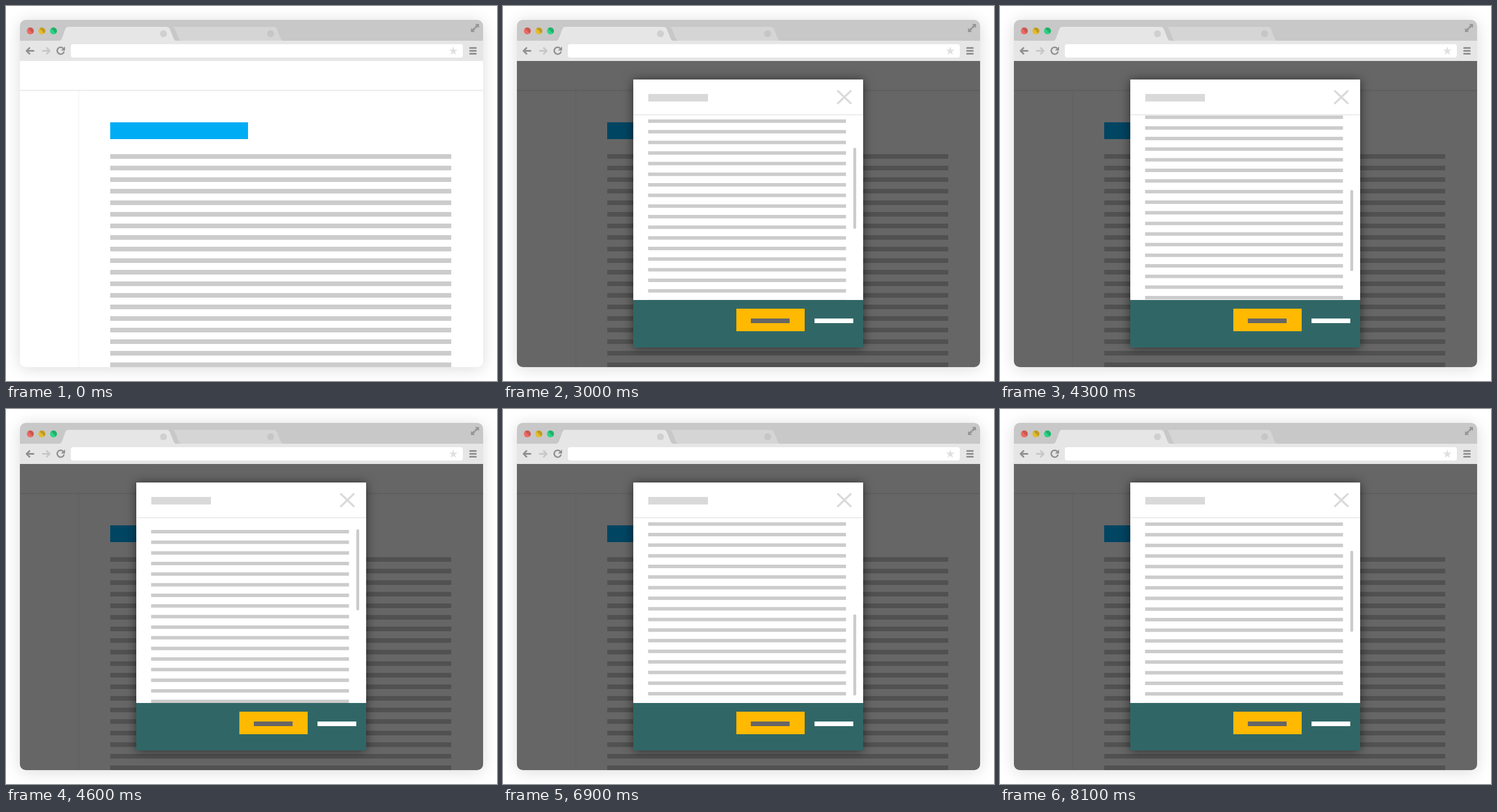
An HTML page for the animation above (8200 ms loop, 848 px wide and 648 px high).

```html
<!DOCTYPE html>
<html lang="en">
<head>
<meta charset="utf-8">
<title>Scrolling dialog</title>
<style>
  html, body { margin: 0; width: 100%; height: 100%; overflow: hidden; background: #fff; }
  #win { position: absolute; left: 24px; top: 24px; width: 800px; height: 600px; border-radius: 10px;
         overflow: hidden; background: #fff; box-shadow: 0 3px 28px rgba(0,0,0,.14); }
  svg { display: block; }
  .edge { fill: #fff; filter: drop-shadow(0 1px 1.2px rgba(0,0,0,.14)); }
  .icon { fill: none; stroke: #919191; stroke-width: 3; stroke-linecap: round; stroke-linejoin: round; }
</style>
</head>
<body>
<div id="win">
<svg width="800" height="600" viewBox="24 24 800 600">
  <!-- page -->
  <rect class="edge" x="10" y="130" width="115" height="520"/>
  <rect class="edge" x="10" y="90" width="830" height="55"/>
  <path fill="#00adf5" d="M180 201h238v29h-238z"/>
  <path stroke="#ccc" stroke-width="589" stroke-dasharray="8 12" d="M474.5 256V624"/>

  <!-- dialog -->
  <g id="dialog">
    <path fill="#000" fill-opacity=".6" d="M24 95h800v529h-800z"/>
    <path fill="#fff" style="filter:drop-shadow(0 1px 9px rgba(0,0,0,.55))" d="M225 127h397v463h-397z"/>
    <path id="lines" stroke="#ccc" stroke-width="341.8" stroke-dasharray="6 12.3333" d="M421.5 209v336"/>
    <rect id="thumb" x="605" y="208" width="5" height="140" rx="2" fill="#ccc"/>
    <rect class="edge" x="225" y="127" width="397" height="60"/>
    <path fill="#d9d9d9" d="M251 152h103v13h-103z"/>
    <path stroke="#dadada" stroke-width="3.5" d="M577.5 146l24 23m0-23l-24 23"/>
    <path fill="#306766" d="M225 508h397v82h-397z"/>
    <path fill="#ffb900" d="M403 523h118v39h-118z"/>
    <path fill="#666" d="M428 540h67v8h-67z"/>
    <path fill="#fff" d="M538 540h67v8h-67z"/>
  </g>

  <!-- browser frame -->
  <path fill="#c8c8c8" d="M24 24h800v36h-800z"/>
  <path fill="#d5d5d5" d="M288 36H462Q466 36 468 40L474 55Q476 60 479 60H303Q300 60 298 55L292 40Q290 36 288 36z"/>
  <path fill="#e6e6e6" d="M24 60H92Q95 60 97 55L102 41Q104 36 107 36H277Q281 36 283 40L289 55Q291 60 294 60H824V95H24z"/>
  <circle cx="272" cy="48" r="6" fill="#d0d0d0"/>
  <circle cx="457" cy="48" r="6" fill="#c6c6c6"/>
  <g id="lights"></g>
  <rect x="112" y="66" width="677" height="23" rx="4" fill="#fff"/>
  <path class="icon" d="M47.5 77.5H36m4.5-5l-5 5l5 5"/>
  <path class="icon" style="stroke:#c8c8c8" d="M63.500 77.500H75m-4.500-5l5 5l-5 5"/>
  <path class="icon" style="stroke-width:2.6;stroke-linecap:butt" d="M99 73.300A6 6 0 1 0 100.300 78.500"/>
  <path fill="#919191" d="M102 70v7h-7z"/>
  <path fill="#e0e0e0" d="M772.500 70l1.800 5.400h5.700l-4.600 3.400l1.700 5.500l-4.600-3.400l-4.600 3.400l1.700-5.500l-4.600-3.400h5.700z"/>
  <path class="icon" d="M801.500 72.500h10m-10 5h10m-10 5h10"/>
  <path fill="#969696" d="M810 31h7v7l-2.300-2.300l-3.200 3.200l-2.400-2.400l3.200-3.200zM810 45h-7v-7l2.300 2.300l3.200-3.200l2.400 2.400l-3.200 3.200z"/>
</svg>
</div>
<script>
const $ = id => document.getElementById(id);
const LOOP = 8200, STEP = 100, STEPS = 4, TEXT = 50, TRACK = 147;

$('lights').innerHTML = [['#ed6a63', '#c95852'], ['#e3bb2e', '#bf9a25'], ['#2bd383', '#22ae6b']]
  .map(([light, dark], i) => {
    const x = 42 + 20 * i;
    return `<circle cx="${x}" cy="43" r="6" fill="${light}"/>
      <path fill="${dark}" d="M${x - 4.24} 38.760A6 6 0 0 1 ${x + 4.24} 47.240z"/>`;
  }).join('');

// Share of a stepped scroll that has been done since its start
const ramp = (t, start) =>
  Math.max(0, Math.min(STEPS, Math.floor((t - start) / STEP) + 1)) / STEPS;

function draw(now) {
  const t = now % LOOP;
  const pos = ramp(t, 3000) - ramp(t, 4300) + ramp(t, 6600) - ramp(t, 7900);
  $('dialog').style.display = t < 1000 ? 'none' : '';
  $('lines').setAttribute('transform', `translate(0 ${-Math.round(pos * TEXT)})`);
  $('thumb').setAttribute('y', 208 + Math.round(pos * TRACK));
}

const begin = performance.now();
function tick() {
  draw(performance.now() - begin);
  requestAnimationFrame(tick);
}
tick();
</script>
</body>
</html>
```
